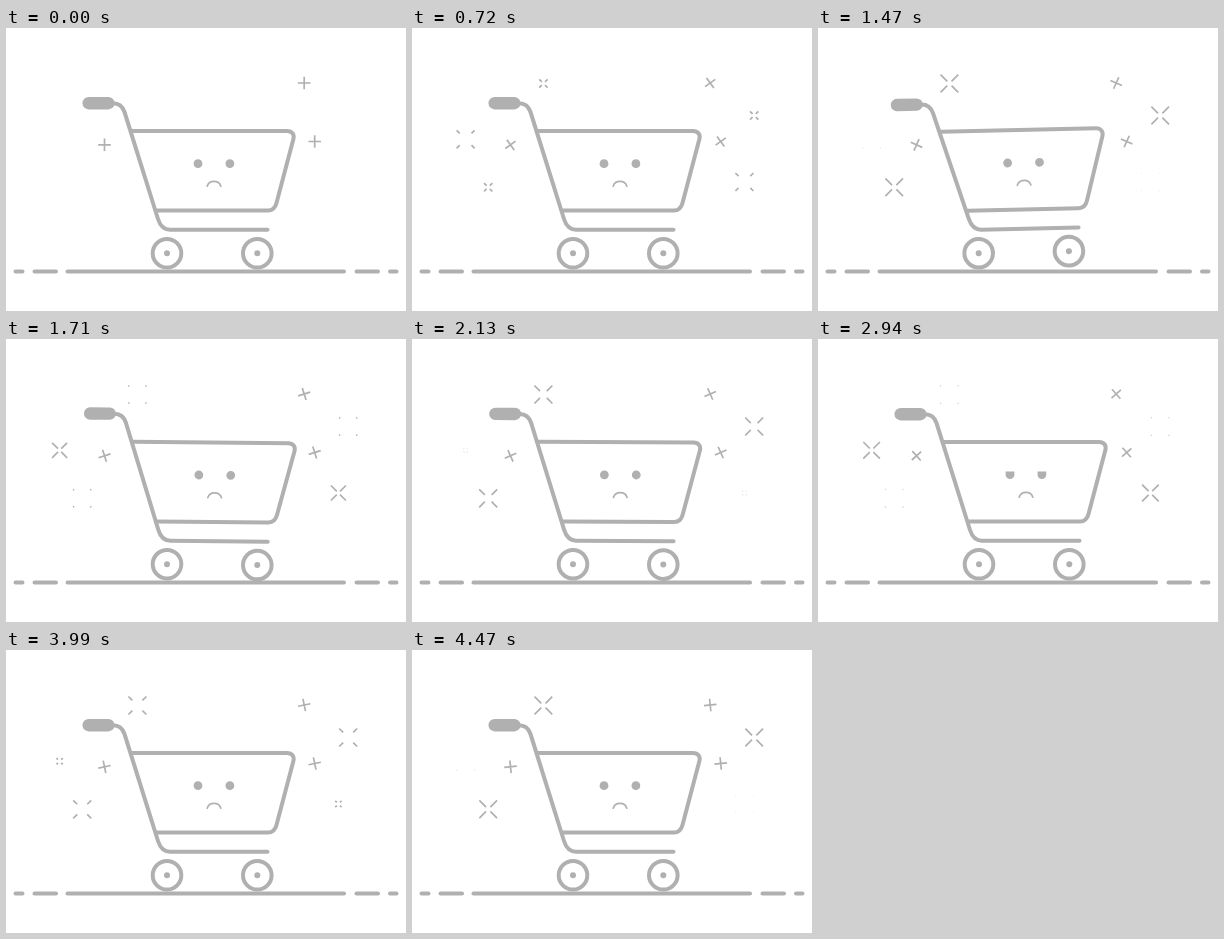
Recreate the animation shown at these times as an HTML page. Size 400 by 283 pixels, loop 4500 ms.

```html
<!DOCTYPE html>
<html lang="en">
<head>
<meta charset="utf-8">
<title>Sad cart</title>
<style>
  html, body { margin: 0; width: 100%; height: 100%; overflow: hidden; background: #fff; }
  svg { display: block; width: 100%; height: 100%; }
  .line { fill: none; stroke: #b0b0b0; stroke-width: 4; stroke-linecap: round; stroke-linejoin: round; }
  .thin { fill: none; stroke: #b0b0b0; stroke-width: 1.7; }
  .solid { fill: #b0b0b0; }
</style>
</head>
<body>
<svg viewBox="0 0 400 283">
  <defs>
    <clipPath id="open"><rect id="openBox" x="180" y="130" width="60" height="14"/></clipPath>
  </defs>
  <path class="line" d="M9.5 243.5H16.5M28.5 243.5H50M61.5 243.5H338M350.5 243.5H372M384 243.5H390.5"/>
  <g id="sparks"></g>
  <g id="cart">
    <rect class="solid" x="76.5" y="69" width="32" height="12.4" rx="6.2"/>
    <path class="line" d="M107 75.2C113 75.2 116.5 78 118.5 84L152 191C154.2 198 157.5 201.7 164 201.7H261.5"/>
    <path class="line" d="M126 103H281C286 103 288.6 106.500 287.400 111L270.500 175C269.200 180 266.500 182.500 262 182.500H151"/>
    <g class="line">
      <circle cx="161" cy="225.200" r="14.300"/>
      <circle cx="251.300" cy="225.200" r="14.300"/>
    </g>
    <g class="solid">
      <circle cx="161" cy="225.200" r="3"/>
      <circle cx="251.300" cy="225.200" r="3"/>
    </g>
    <g class="solid" clip-path="url(#open)">
      <circle cx="192" cy="135.700" r="4.400"/>
      <circle cx="223.900" cy="135.700" r="4.400"/>
    </g>
    <path id="lids" class="thin" d="M187.600 0H196.400M219.500 0H228.300"/>
    <path class="thin" stroke-linecap="round" d="M201.200 158.200C203.200 151.800 212.800 151.800 214.800 158.200"/>
    <path id="tear" class="solid" d="M0 -3.500C1.200 -1.500 2.200 -.3 2.200 1A2.200 2.200 0 0 1 -2.200 1C-2.200 -.3 -1.200 -1.500 0 -3.500Z"/>
  </g>
</svg>
<script>
  const LOOP = 4500, BURST = 600, TURN = 900;
  const $ = id => document.getElementById(id);
  const clamp = x => Math.min(1, Math.max(0, x));
  const ease = x => (1 - Math.cos(Math.PI * clamp(x))) / 2;

  // Eased value through [time, value] stops
  function track(t, stops) {
    if (t <= stops[0][0]) return stops[0][1];
    for (let i = 1; i < stops.length; i++) {
      const [t0, a] = stops[i - 1], [t1, b] = stops[i];
      if (t < t1) return a + (b - a) * ease((t - t0) / (t1 - t0));
    }
    return stops[stops.length - 1][1];
  }

  function addPath(x, y, d = '') {
    const p = document.createElementNS('http://www.w3.org/2000/svg', 'path');
    p.setAttribute('class', 'thin');
    p.setAttribute('d', d);
    p.setAttribute('transform', `translate(${x} ${y})`);
    $('sparks').append(p);
    return { p, x, y };
  }

  const pluses = [[298.2, 55], [98.5, 116.8], [308.7, 113.5]]
    .map(([x, y]) => addPath(x, y, 'M-6.3 0H6.3M0 -6.3V6.3'));

  // x, y, start delay
  const bursts = [[131.4, 55.5, 0], [342.2, 87.5, 0], [76.2, 159.3, 0], [53.6, 111.3, 300], [332.4, 154, 300]]
    .map(([x, y, delay]) => ({ ...addPath(x, y), delay }));

  // Four diagonal rays: the outer ends shoot out, the inner ends follow
  function rays(t) {
    if (t < 0) return '';
    const p = t % BURST;
    const inner = 1.6 + 7.4 * ease((p - 200) / 400);
    const outer = 1.6 + 7.4 * ease(p / 300);
    if (outer - inner < 0.01) return '';
    return [[1, 1], [1, -1], [-1, 1], [-1, -1]]
      .map(([sx, sy]) => `M${sx * inner} ${sy * inner}L${sx * outer} ${sy * outer}`).join('');
  }

  const tilt = [[780, 0], [1210, -3.6], [1700, 0.55], [2130, 0.25], [2500, 0]];
  const shift = [[780, 0], [1210, -1], [1640, 0]];
  const lid = [[2730, 130.6], [2940, 133.3], [3060, 133.3], [3240, 130.6]];
  const tearFade = [[3180, 0], [3270, 1], [3360, 1], [3570, 0]];

  function draw(now) {
    const t = now % LOOP;

    for (const { p, x, y } of pluses)
      p.setAttribute('transform', `translate(${x} ${y}) rotate(${t % TURN / TURN * 180})`);
    for (const { p, delay } of bursts) p.setAttribute('d', rays(t - delay));

    $('cart').setAttribute('transform',
      `translate(${track(t, shift)} 0) rotate(${track(t, tilt)} 161 225.2)`);

    const y = track(t, lid);
    $('openBox').setAttribute('y', y);
    $('lids').setAttribute('transform', `translate(0 ${y})`);
    $('lids').setAttribute('opacity', clamp((y - 130.6) / 0.8));

    const fall = clamp((t - 3180) / 390);
    $('tear').setAttribute('transform', `translate(228.3 ${143 + 23.500 * fall})`);
    $('tear').setAttribute('opacity', track(t, tearFade));

    requestAnimationFrame(draw);
  }
  draw(performance.now());
</script>
</body>
</html>
```
